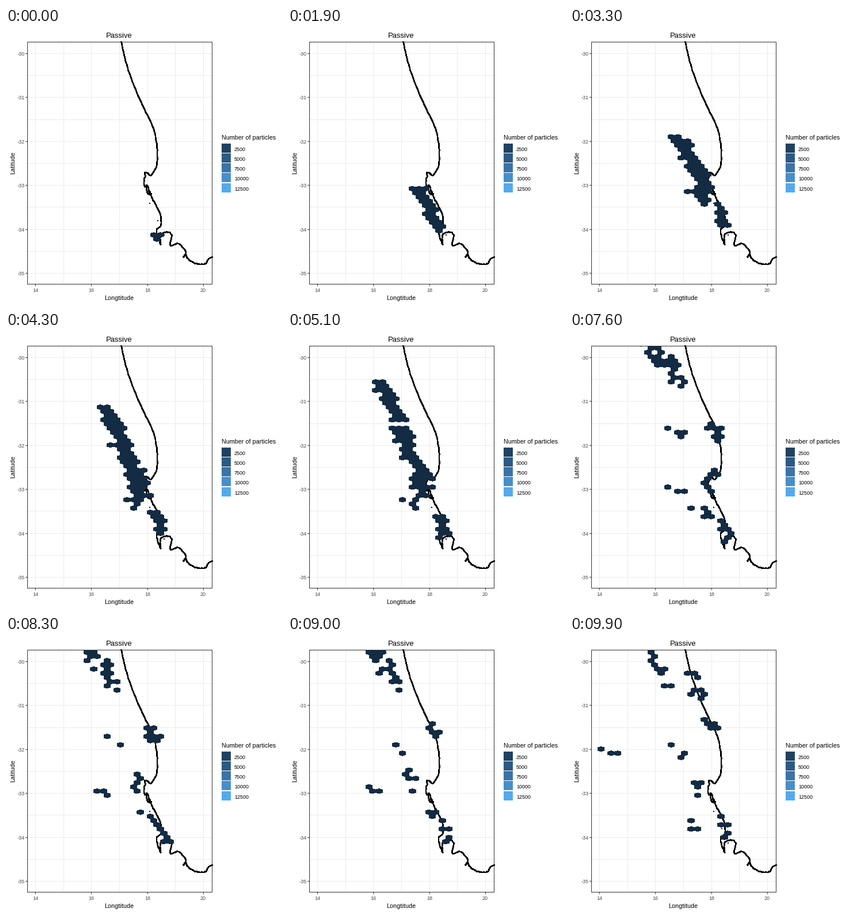
Recreate the animation shown at these times as a matplotlib script. Size 480 by 480 pixels, loop 10 s.

```python
import numpy as np
import matplotlib.pyplot as plt
from matplotlib.animation import FuncAnimation
from matplotlib.collections import PolyCollection
from matplotlib.patches import Rectangle

plt.rcParams["font.family"] = "Liberation Sans"

SIZE, DPI = 480, 72
FRAMES, INTERVAL = 100, 100
LEFT, TOP, RIGHT, BOTTOM = 37, 24, 358, 445     # pixel columns and rows of the border
X0, DX, DY = 65.7, 5.795, 7.32                  # hex lattice: origin, half pitch, row pitch
GRID, EDGE, GREY, DARK = "#EBEBEB", "#333333", "#4D4D4D", "#132B43"

fig = plt.figure(figsize=(SIZE / DPI, SIZE / DPI), dpi=DPI, facecolor="white")
ax = fig.add_axes([0, 0, 1, 1])
ax.set_xlim(0, SIZE)
ax.set_ylim(SIZE, 0)
ax.axis("off")
panel = Rectangle((LEFT, TOP), RIGHT - LEFT + 1, BOTTOM - TOP + 1,
                  transform=ax.transData)


def box(x, y, w, h, color, z=1):
    ax.add_patch(Rectangle((x, y), w, h, fc=color, ec="none", zorder=z,
                           antialiased=False))


def label(x, y, text, size, color="black", ha="left"):
    ax.text(x, y, text, fontsize=size, color=color, ha=ha, va="baseline")


def lon_x(lon):
    return int(51.5 + 48.67 * (lon - 14))


def lat_y(lat):
    return int(44.5 - 76.4 * (lat + 30))


def draw_axes():
    width, height = RIGHT - LEFT + 1, BOTTOM - TOP + 1
    for lon in range(14, 21):
        box(lon_x(lon), TOP, 1, height, GRID)
    for lat in np.arange(-35, -29.9, 0.5):
        box(LEFT, lat_y(lat), width, 1, GRID)
    for lon in range(14, 21, 2):
        box(lon_x(lon), BOTTOM, 1, 4, EDGE)
        label(lon_x(lon), 459, str(lon), 9, GREY, "center")
    for lat in range(-35, -29):
        box(LEFT - 3, lat_y(lat), 3, 1, EDGE)
        label(32.5, lat_y(lat) + 4, str(lat), 9, GREY, "right")
    for x in (LEFT, RIGHT):
        box(x, TOP, 1, height, EDGE, 5)
    for y in (TOP, BOTTOM):
        box(LEFT, y, width, 1, EDGE, 5)
    label(196.5, 17, "Passive", 13, ha="center")
    label(197, 473, "Longtitude", 10.8, ha="center")
    ax.text(12.3, 235, "Latitude", fontsize=10.8, rotation=90,
            ha="center", va="center")


def draw_legend():
    label(375, 194, "Number of particles", 10.7)
    shades = ("#1F4263", "#2B5A84", "#3874A7", "#458FCB", "#52AAEE")
    for i, shade in enumerate(shades):
        y = int(201 + 17.28 * i)
        box(375, y, 16, 16, shade)
        label(397, y + 13, str(2500 * (i + 1)), 9)


def smooth(points, steps=6):
    """Catmull-Rom curve through the points."""
    p = np.array(points, float)
    p = np.vstack([2 * p[0] - p[1], p, 2 * p[-1] - p[-2]])
    u = np.linspace(0, 1, steps, endpoint=False)[:, None]
    parts = [b + 0.5 * u * (c - a + u * (2 * a - 5 * b + 4 * c - d
                                         + u * (3 * (b - c) + d - a)))
             for a, b, c, d in zip(p, p[1:], p[2:], p[3:])]
    return np.vstack(parts + [p[-2:-1]])


def draw_coast():
    shore = [(200, 24), (208, 58), (218, 88), (230, 118), (246, 152), (258, 180),
             (263, 212), (262, 240), (252, 256), (246, 252), (241, 252), (242, 258),
             (240, 265), (241, 276), (246, 274), (251, 290), (259, 305), (268, 324),
             (270, 342), (264, 348), (262, 353), (264, 364), (269, 376), (268, 365),
             (271, 357), (281, 355), (288, 360), (286, 378), (299, 375), (308, 382),
             (313, 391), (309, 398), (313, 395), (317, 402), (328, 409), (340, 411),
             (348, 409), (352, 402), (359, 398)]
    lagoon = [(246, 275), (244, 281), (247, 288), (252, 289), (248, 281)]
    rng = np.random.default_rng(4)
    for points in (shore, lagoon):
        curve = smooth(points)
        curve += rng.uniform(-0.5, 0.5, curve.shape)
        ax.plot(*curve.T, color="black", lw=1.6, zorder=2, antialiased=False,
                solid_joinstyle="round", clip_path=panel)
    for x, y in ((249, 304), (263, 334), (274, 359)):
        box(x, y, 2, 2, "black", 2)


RELEASE = (263, 363)
TIMES = (0.6, 3.3, 5.1, 6.4, 7.6, 9.0, 9.9)
GOLDEN = (5 ** 0.5 - 1) / 2
rng = np.random.default_rng(11)


class Patch:
    """Particles spread along a slanted streak whose centre follows a path."""

    def __init__(self, count, axis, width, *path):
        u = np.linspace(-1, 1, count)[:, None]
        v = 2 * (np.arange(count) * GOLDEN % 1)[:, None] - 1
        self.offsets = rng.permutation(u * axis + v * [width, 0])
        self.path = np.array((RELEASE,) + path).T

    def at(self, t):
        centre = [np.interp(t, TIMES, c) for c in self.path]
        spread = np.interp(t, TIMES[:2], (0.15, 1))
        thinning = np.interp(t, (6, 9.9), (1, 0.6))
        left = round(len(self.offsets) ** thinning)
        return centre + spread * self.offsets[:left]


patches = [
    # leading band
    Patch(70, (18, 34), 10,
          (208, 225), (178, 120), (137, 50), (142, 28), (153, 33), (155, 60)),
    # main body behind it
    Patch(30, (10, 30), 11,
          (225, 258), (206, 196), (172, 112), (182, 68), (178, 65), (215, 85)),
    # along the coast
    Patch(18, (6, 15), 10,
          (232, 268), (234, 240), (217, 155), (256, 174), (255, 163), (247, 148)),
    # near the release point
    Patch(14, (4, 18), 7,
          (265, 328), (268, 336), (272, 335), (273, 345), (274, 340), (271, 332)),
    # offshore stragglers
    Patch(10, (-4, 20), 10,
          (234, 285), (228, 270), (233, 240), (243, 258), (210, 252), (220, 265)),
    Patch(8, (14, 8), 8,
          (232, 292), (234, 265), (224, 285), (237, 314), (255, 310), (214, 330)),
    Patch(6, (8, 8), 8,
          (228, 290), (218, 302), (178, 210), (187, 172), (200, 197), (196, 200)),
    Patch(5, (10, 4), 6,
          (205, 215), (198, 190), (178, 205), (187, 274), (152, 267), (71, 201)),
]


def hex_centres(t):
    """Centres of the lattice cells that hold at least one particle."""
    x, y = np.vstack([p.at(t) for p in patches]).T
    base, parity = (367.2, 0) if t < 2 else (350.3, 1)
    row = np.round((base - y) / DY)
    odd = (row + parity) % 2
    col = odd + 2 * np.round(((x - X0) / DX - odd) / 2)
    cells = np.unique(np.column_stack([col, row]), axis=0)
    return cells * [DX, -DY] + [X0, base]


draw_axes()
draw_legend()
draw_coast()

SIDE, TIP = DY / 3, 0.57 * DY
HEX = np.array([(DX, SIDE), (DX, -SIDE), (0, -TIP),
                (-DX, -SIDE), (-DX, SIDE), (0, TIP)])
cells = PolyCollection([], facecolors=DARK, edgecolors="none", zorder=3,
                       antialiaseds=False)
ax.add_collection(cells, autolim=False)
cells.set_clip_path(panel)


def update(step):
    cells.set_verts([HEX + c for c in hex_centres(step * INTERVAL / 1000)])
    return (cells,)


anim = FuncAnimation(fig, update, frames=FRAMES, interval=INTERVAL,
                     init_func=lambda: update(0), repeat=True, repeat_delay=0,
                     blit=False)
plt.show()
```
